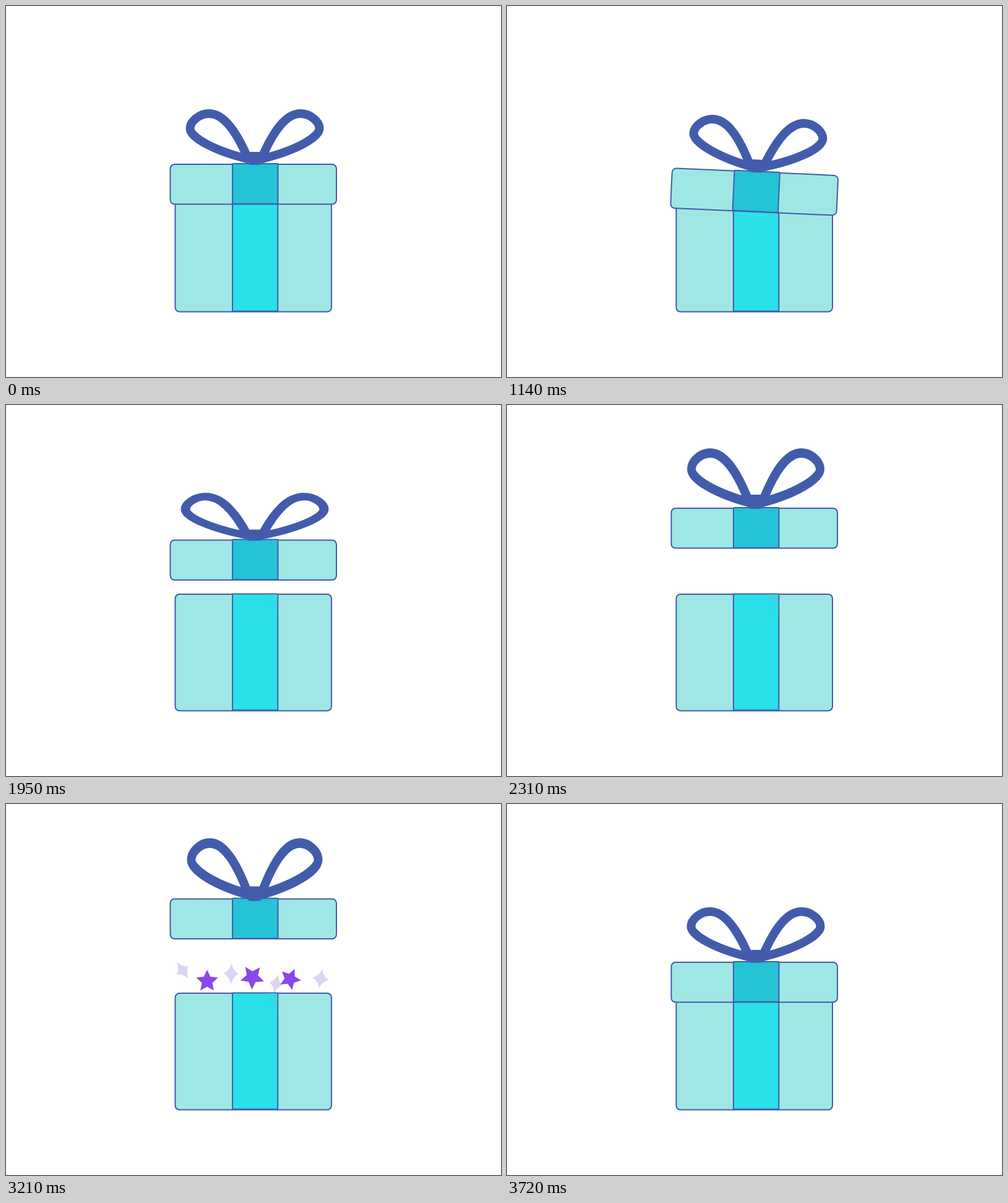
An HTML page that plays this animation: 800x600 px, repeating every 5070 ms.

```html
<!DOCTYPE html>
<html lang="en">
<head>
<meta charset="utf-8">
<title>Gift box</title>
<style>
  html, body { margin: 0; width: 100%; height: 100%; overflow: hidden; background: #fff; }
  svg { display: block; width: 100%; height: 100%; }
  .box { fill: #9fe7e5; stroke: #425cab; stroke-width: 2; }
  .ribbon { fill: #2ae1e9; stroke: #425cab; stroke-width: 2; }
  .band { fill: #24c3d6; }
  .loop { fill: none; stroke: #425cab; stroke-width: 14; }
</style>
</head>
<body>
<svg viewBox="0 0 800 600">
  <g id="confetti"></g>
  <rect class="box" x="273.5" y="306" width="252.5" height="188.5" rx="7"/>
  <rect class="ribbon" x="366" y="305.5" width="73.3" height="188" rx="1"/>
  <path id="sheen" d="M424 306.5H438.3V338Q428 326 424 306.5Z" fill="#38d8e5"/>
  <g id="lid">
    <rect class="box" x="265.5" y="256" width="268.5" height="64.5" rx="7"/>
    <rect class="ribbon band" x="366" y="255" width="73.5" height="65" rx="1"/>
    <g id="bow">
      <path id="loop" class="loop" d="M390 244C372 203 352 174 328 174C312 174 297.5 187 297.5 198C297.5 212 335 235 402 250"/>
      <use href="#loop" transform="matrix(-1 0 0 1 804 0)"/>
      <rect x="389.5" y="236" width="25" height="21" rx="6" fill="#425cab"/>
    </g>
  </g>
</svg>
<script>
const LOOP = 5070, STEP = 30;
const $ = id => document.getElementById(id);

// Smooth curve through [time, value] keys that never overshoots them.
function curve(...keys) {
  const slope = i => (keys[i + 1][1] - keys[i][1]) / (keys[i + 1][0] - keys[i][0]);
  const tangents = keys.map((_, i) => {
    if (i === 0 || i === keys.length - 1) return 0;
    const a = slope(i - 1), b = slope(i);
    return a * b > 0 ? 2 * a * b / (a + b) : 0;
  });
  return t => {
    if (t <= keys[0][0]) return keys[0][1];
    const i = keys.findIndex(k => k[0] > t) - 1;
    if (i < 0) return keys[keys.length - 1][1];
    const [t0, v0] = keys[i], [t1, v1] = keys[i + 1];
    const d = t1 - t0, p = (t - t0) / d, q = 1 - p;
    return v0 * (1 + 2 * p) * q * q + v1 * p * p * (3 - 2 * p)
      + d * p * q * (tangents[i] * q - tangents[i + 1] * p);
  };
}

const lift = curve([540, 0], [1140, 12.2], [1500, 20], [1590, 21], [1950, -37.5],
  [2160, -72], [2310, -89], [2670, -115.5], [3210, -102.5], [3470, -58], [3720, 0]);
const tilt = curve([540, 0], [1140, 2.56], [1500, 3], [1620, 1.8], [1800, 0]);
const bowX = curve([1590, 1], [1950, 1.072], [2310, 0.995], [2670, 0.982], [3210, 0.982], [3720, 1]);
const bowY = curve([1590, 1], [1950, 0.86], [2310, 1.09], [2670, 1.13], [3210, 1.13], [3720, 1]);
const bowDrop = curve([2310, 0], [2670, 2], [3210, 2.5], [3720, 0]);
const burst = curve([2310, -1.3], [2700, 1], [3210, 0], [3420, -1.3]);

function star(r) {
  const points = Array.from({ length: 10 }, (_, i) => {
    const a = i * Math.PI / 5, d = i % 2 ? r * 0.48 : r;
    return `${d * Math.sin(a)} ${-d * Math.cos(a)}`;
  });
  return `M${points.join("L")}Z`;
}

function spark(w, h) {
  const x = w / 4, y = h / 4;
  return `M0 ${-h}Q${x} ${-y} ${w} 0Q${x} ${y} 0 ${h}Q${-x} ${y} ${-w} 0Q${-x} ${-y} 0 ${-h}Z`;
}

const PALE = "#dbd5f1", VIOLET = "#8a48ec";
const pieces = [
  [285.5, 269, -35, PALE, spark(12, 16.5)],
  [364, 274.5, 2, PALE, spark(12, 17.5)],
  [436.5, 291, 12, PALE, spark(11, 16)],
  [508.5, 282.5, 10, PALE, spark(13.5, 16)],
  [325, 286.5, 0, VIOLET, star(18.5)],
  [398, 280, -34, VIOLET, star(20)],
  [459, 283, 25, VIOLET, star(18)]
].map(([x, y, turn, fill, d]) => {
  const node = document.createElementNS("http://www.w3.org/2000/svg", "path");
  node.setAttribute("d", d);
  node.setAttribute("fill", fill);
  $("confetti").append(node);
  return { x, y, turn, node };
});

function draw(t) {
  $("lid").setAttribute("transform", `translate(0 ${lift(t)}) rotate(${tilt(t)} 399.75 288)`);
  $("bow").setAttribute("transform",
    `translate(402 ${257 + bowDrop(t)}) scale(${bowX(t)} ${bowY(t)}) translate(-402 -257)`);
  const open = t > 1700 && t < 3690;
  $("sheen").style.display = open ? "" : "none";
  $("confetti").style.display = t > 2310 && t < 3420 ? "" : "none";
  const u = burst(t);
  for (const { x, y, turn, node } of pieces) {
    node.setAttribute("transform",
      `translate(${x + 0.26 * u * (x - 400)} ${y - 45 * u}) rotate(${turn})`);
  }
}

const start = performance.now();
function tick() {
  const t = (performance.now() - start) % LOOP;
  draw(Math.floor(t / STEP) * STEP);
  requestAnimationFrame(tick);
}
tick();
</script>
</body>
</html>
```
